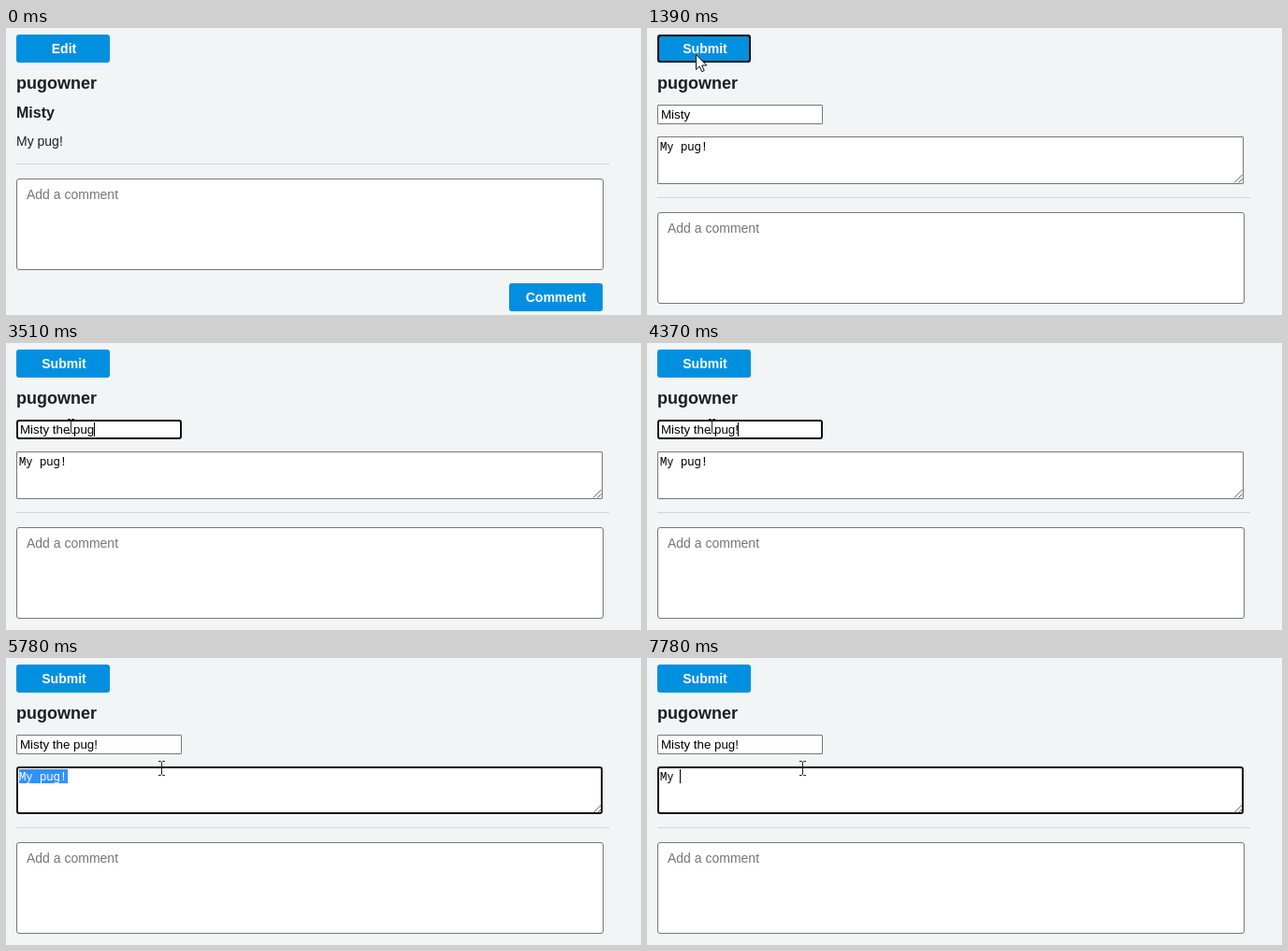
Recreate the animation shown at these times as an HTML page. Size 679 by 307 pixels, loop 8 s.

```html
<!DOCTYPE html>
<html lang="en">
<head>
<meta charset="utf-8">
<title>Edit post form</title>
<style>
  html, body { margin: 0; width: 100%; height: 100%; overflow: hidden; background: #f1f5f6; }
  svg { display: block; width: 679px; height: 307px; }
  text { font: 14px "Liberation Sans", Arial, sans-serif; fill: #1c1f21; white-space: pre; }
  .button { fill: #0090df; }
  .label { font-weight: bold; fill: #fff; text-anchor: middle; }
  .user { font-size: 18px; font-weight: bold; }
  .title { font-size: 16px; font-weight: bold; }
  .field { fill: #fff; stroke: #767676; }
  .field.hover { stroke: #4a4a4a; }
  .field.focus { stroke: #101010; stroke-width: 2; }
  .hint { fill: #757575; }
  #titleText { font-size: 13.333px; fill: #000; }
  #bodyText { font: 12.2px "Noto Sans Mono", "DejaVu Sans Mono", monospace; fill: #000; }
  #bodyText.selected { fill: #fff; }
</style>
</head>
<body>
<svg viewBox="0 0 679 307">
  <rect class="button" x="11" y="7" width="100" height="30" rx="3"/>
  <rect id="buttonRing" x="12" y="8" width="98" height="28" rx="2.5" fill="none" stroke="#101010" stroke-width="2"/>
  <text id="buttonLabel" class="label" x="62" y="27"></text>
  <text class="user" x="11" y="65">pugowner</text>

  <g id="view">
    <text class="title" x="11" y="96">Misty</text>
    <text x="11" y="126">My pug!</text>
  </g>

  <g id="form">
    <rect id="titleField" class="field"/>
    <text id="titleText" x="15" y="97"></text>
    <rect id="bodyField" class="field"/>
    <path d="M628 165.500L636.500 157M632.500 165.500L636.500 161.500" stroke="#555" fill="none"/>
    <rect id="selection" x="14" y="119" width="52" height="15" fill="#3390ff"/>
    <text id="bodyText" x="14" y="131"></text>
    <rect id="caret" width="1" height="15"/>
  </g>

  <g id="comments">
    <rect x="11" y="145" width="634" height="1" fill="#cfd7d8"/>
    <rect class="field" x="11.500" y="161.500" width="627" height="97" rx="2.500"/>
    <text class="hint" x="22" y="183">Add a comment</text>
    <rect class="button" x="538" y="273" width="100" height="30" rx="3"/>
    <text class="label" x="588" y="293">Comment</text>
  </g>

  <path id="arrow" d="M.5 .5V16.500L4.200 13L6.700 18.700L9.200 17.600L6.700 12H11.800Z" fill="#fff" stroke="#111"/>
  <path id="beam" d="M-3 -7.500H-.5L.5 -6.500L1.500 -7.500H4M.5 -6.500V6.500M-3 7.500H-.5L.5 6.500L1.500 7.500H4" fill="none" stroke="#222"/>
</svg>
<script>
const LOOP = 8000, MOUSE_TICK = 78;
const SHOW_MOUSE = 210, PRESS = 1310, OPEN_FORM = 1390;
const FOCUS_TITLE = 2100, FOCUS_BODY = 5450, SELECT = 5620, CLEAR = 6540;
const titleKeys = [2640, 2800, 2880, 2960, 3040, 3120, 3350, 3510, 4370];
const bodyKeys = [7320, 7630, 7780];

// Pointer waypoints: time, x, y
const route = [
  [210, 438, 231], [560, 190, 100], [935, 52, 33], [1010, 52, 28], [1400, 52, 28],
  [1720, 72, 90], [1880, 74, 98], [2180, 69, 89], [4820, 69, 89], [5140, 166, 118]
];

const $ = id => document.getElementById(id);
const show = (id, on) => $(id).setAttribute("visibility", on ? "visible" : "hidden");
const move = (id, x, y) => $(id).setAttribute("transform", `translate(${x} ${y})`);
const typed = (text, keys, t) => text.slice(0, keys.filter(k => t >= k).length);
const within = (t, ...spans) => spans.some(([from, to]) => t >= from && t < to);

function pointerAt(time) {
  const t = Math.floor(time / MOUSE_TICK) * MOUSE_TICK;
  const next = route.findIndex(p => p[0] > t);
  if (next === 0) return route[0].slice(1);
  if (next < 0) return route.at(-1).slice(1);
  const [t0, x0, y0] = route[next - 1], [t1, x1, y1] = route[next];
  const u = (t - t0) / (t1 - t0);
  return [Math.round(x0 + (x1 - x0) * u), Math.round(y0 + (y1 - y0) * u)];
}

function drawField(id, x, y, w, h, focused, hovered) {
  const inset = focused ? 1 : 0.5;
  const box = { x: x + inset, y: y + inset, width: w - 2 * inset, height: h - 2 * inset, rx: focused ? 2 : 0.5 };
  for (const key in box) $(id).setAttribute(key, box[key]);
  $(id).setAttribute("class", "field" + (focused ? " focus" : hovered ? " hover" : ""));
}

function drawForm(t, x, y) {
  const inBody = t >= FOCUS_BODY, inTitle = t >= FOCUS_TITLE && !inBody;
  const selected = within(t, [SELECT, CLEAR]);
  drawField("titleField", 11, 82, 177, 21, inTitle, y >= 82 && y < 103);
  drawField("bodyField", 11, 116, 627, 51, inBody, y >= 116 && y < 167);

  $("titleText").textContent = "Misty" + typed(" the pug!", titleKeys, t);
  $("bodyText").textContent = t < CLEAR ? "My pug!" : typed("My ", bodyKeys, t);
  $("bodyText").setAttribute("class", selected ? "selected" : "");
  show("selection", selected);

  const active = $(inBody ? "bodyText" : "titleText");
  const width = active.textContent ? active.getComputedTextLength() : 0;
  const left = inBody ? 14 : 15;
  move("caret", Math.floor(left + width), inBody ? 119 : 85);
  show("caret", within(t, [FOCUS_TITLE, 3970], [4370, 4870], [FOCUS_BODY, SELECT], [CLEAR, 7090], [7320, LOOP]));
}

function draw(t) {
  const editing = t >= OPEN_FORM;
  const [x, y] = pointerAt(t);
  $("view").style.display = editing ? "none" : "";
  $("form").style.display = editing ? "" : "none";
  $("buttonLabel").textContent = editing ? "Submit" : "Edit";
  show("buttonRing", within(t, [PRESS, FOCUS_TITLE]));
  move("comments", 0, editing ? 36 : 0);
  if (editing) drawForm(t, x, y);

  const overText = editing ? within(y, [82, 103], [116, 167]) : within(y, [161, 259]);
  show("arrow", t >= SHOW_MOUSE && !overText);
  show("beam", t >= SHOW_MOUSE && overText);
  move("arrow", x, y);
  move("beam", x, y);
}

const start = performance.now();
function tick() {
  draw((performance.now() - start) % LOOP);
  requestAnimationFrame(tick);
}
tick();
</script>
</body>
</html>
```
